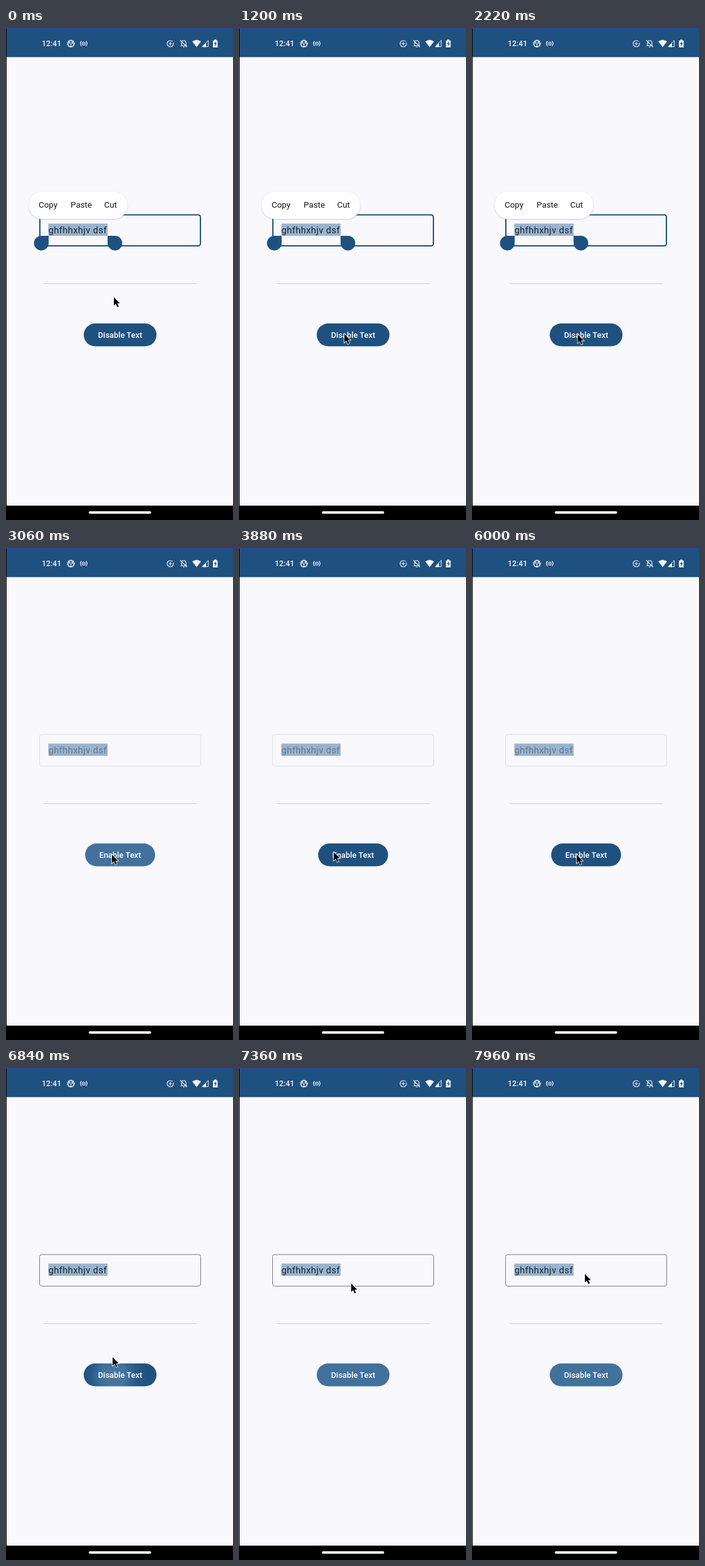
These frames come from a looping animation (362 by 786 pixels, 8 s). An HTML page:

```html
<!DOCTYPE html>
<html lang="en">
<head>
<meta charset="utf-8">
<style>
  html, body { margin: 0; width: 100%; height: 100%; overflow: hidden; background: #f9f8fd; }
  svg { display: block; width: 100%; height: 100%; font-family: Roboto, sans-serif; }
  .icons { fill: none; stroke: #f2f5fa; stroke-width: 1.2; }
  .icons .solid { fill: #f2f5fa; stroke: none; }
  .menu { font-size: 13.4px; fill: #16171c; }
  .label { font-size: 12.7px; font-weight: 500; letter-spacing: .09px; fill: #fff; text-anchor: middle; }
</style>
</head>
<body>
<svg viewBox="0 0 362 786">
  <defs>
    <radialGradient id="ripple" gradientUnits="userSpaceOnUse" cx="172" cy="491" r="60">
      <stop offset="0" stop-color="#4a7aa2"/>
      <stop offset=".35" stop-color="#42739d"/>
      <stop offset=".7" stop-color="#255685"/>
      <stop offset="1" stop-color="#1f5180"/>
    </radialGradient>
    <filter id="shadow" x="-10%" y="-20%" width="120%" height="150%">
      <feDropShadow dx="0" dy="1" stdDeviation="1" flood-color="#a9a9b4" flood-opacity=".6"/>
    </filter>
  </defs>

  <rect width="362" height="786" fill="#f9f8fd"/>
  <rect width="362" height="46.5" fill="#1f5180"/>
  <rect width="362" height="1" fill="#2b45a0"/>
  <rect y="763" width="362" height="23" fill="#000"/>
  <rect x="132" y="772" width="99.5" height="4" rx="2" fill="#fafafa"/>
  <rect y="1" width="1" height="785" fill="#000"/>

  <text x="57" y="29" font-size="12.3" font-weight="500" fill="#f2f5fa">12:41</text>
  <g class="icons">
    <circle cx="103.500" cy="25" r="4.800"/>
    <circle cx="103.500" cy="25" r="5.700" stroke-dasharray="1.6 1.4"/>
    <path d="M99 24h9M103.500 25v5M101 20.500v3M106 20.500v3"/>
    <circle class="solid" cx="124" cy="25" r="1"/>
    <circle cx="124" cy="25" r="2.600" stroke-width="1"/>
    <path d="M120.500 21q-3.500 4 0 8M127.500 21q3.500 4 0 8"/>
    <circle cx="262" cy="25" r="5" stroke-dasharray="27 2 2 2"/>
    <path d="M262 22.500v5M259.500 25h5"/>
    <path d="M278.500 28.500h10M280 28v-4q0-4 3.500-4t3.500 4v4M278 19.500l10.500 11M282.500 30.500h2"/>
    <path class="solid" d="M297 21.500q7-5 14 0l-7 9z"/>
    <path d="M313 29.800h9.500v-10z" stroke-width="1"/>
    <path class="solid" d="M313 30.300h6v-6.500z"/>
    <path class="solid" fill-rule="evenodd" d="M330 20h2v-1.500h3.500v1.500h2v11h-7.500zM334.500 21.500l-3 4h1.800v3.500l3-4.500h-1.800z"/>
  </g>

  <rect id="field" rx="3.500" fill="none"/>
  <rect x="67.500" y="312.500" width="94.500" height="19.500" fill="#9ab3ce"/>
  <text id="value" x="67.700" y="328" font-size="14.56" letter-spacing=".45">ghfhhxhjv dsf</text>
  <path d="M60 408.500h244" stroke="#cbcad3"/>

  <g id="selectionTools">
    <path d="M68 332v11.500a11.700 11.700 0 1 1-11.700-11.500z" fill="#1f5180"/>
    <path d="M162 332v11.500a11.700 11.700 0 1 0 11.700-11.500z" fill="#1f5180"/>
    <rect x="36" y="261.500" width="157.500" height="43.500" rx="21.700" fill="#fefefe" filter="url(#shadow)"/>
    <g class="menu">
      <text x="52" y="287">Copy</text>
      <text x="103" y="287">Paste</text>
      <text x="156.500" y="287">Cut</text>
    </g>
  </g>

  <rect id="button" y="472" height="36.500" rx="18.250"/>
  <text id="label" class="label" x="182" y="495"></text>

  <path id="cursor" d="M0 0v13.500l3.100-3 2.400 5.400 2.300-1-2.400-5.200h4.200z"
        fill="#000" stroke="#fff" stroke-width="1.600" paint-order="stroke"/>
</svg>
<script>
  const LOOP = 8000, DISABLE_AT = 2700, ENABLE_AT = 6640;
  const DARK = [31, 81, 128], PRESSED = [66, 113, 155];

  // time, x, y of the pointer tip
  const pointerPath = [
    [0, 172, 430], [150, 172, 430], [900, 168, 489], [3060, 169, 490],
    [3450, 169, 490], [4300, 134, 482], [5000, 134, 482], [5700, 167, 490],
    [6600, 167, 490], [6840, 170, 462], [7500, 180, 329], [LOOP, 180, 329]
  ];

  const el = id => document.getElementById(id);
  const set = (id, attrs) => {
    for (const name in attrs) el(id).setAttribute(name, attrs[name]);
  };
  const clamp = v => Math.max(0, Math.min(1, v));
  const ease = v => v * v * (3 - 2 * v);
  const lerp = (a, b, k) => a + (b - a) * k;
  const mix = (a, b, k) => `rgb(${a.map((v, i) => Math.round(lerp(v, b[i], k)))})`;
  const ramp = (t, start, length) => clamp((t - start) / length);

  function pointerAt(t) {
    const i = pointerPath.findIndex(p => p[0] > t);
    const [t0, x0, y0] = pointerPath[i - 1], [t1, x1, y1] = pointerPath[i];
    const k = ease((t - t0) / (t1 - t0));
    return [lerp(x0, x1, k), lerp(y0, y1, k)];
  }

  function buttonFill(t) {
    if (t >= ENABLE_AT && t < ENABLE_AT + 360) return 'url(#ripple)';
    const pressed = t < ENABLE_AT ? ramp(t, DISABLE_AT, 200) - ramp(t, 3240, 200) : 1;
    return mix(DARK, PRESSED, pressed);
  }

  function draw(t) {
    const focused = t < DISABLE_AT;
    const disabled = !focused && t < ENABLE_AT;
    const buttonWidth = disabled ? 111.5 : 116;
    const border = focused ? 2 : 1;

    // The outer edge of the field stays fixed while its border changes weight.
    set('field', {
      x: 53 + border / 2, y: 297.5 + border / 2,
      width: 258 - border, height: 51.5 - border,
      stroke: focused ? '#1f5180' : disabled ? '#dfdee6' : '#777b8c',
      'stroke-width': border
    });
    set('value', { fill: disabled ? '#67788d' : '#1c232d' });
    set('selectionTools', { visibility: focused ? 'visible' : 'hidden' });
    set('ripple', { r: lerp(10, 78, ramp(t, ENABLE_AT, 300)) });
    set('button', { x: 182 - buttonWidth / 2, width: buttonWidth, fill: buttonFill(t) });
    el('label').textContent = disabled ? 'Enable Text' : 'Disable Text';
    set('cursor', { transform: `translate(${pointerAt(t)})` });
  }

  const start = performance.now();
  function frame() {
    draw((performance.now() - start) % LOOP);
    requestAnimationFrame(frame);
  }
  frame();
</script>
</body>
</html>
```
